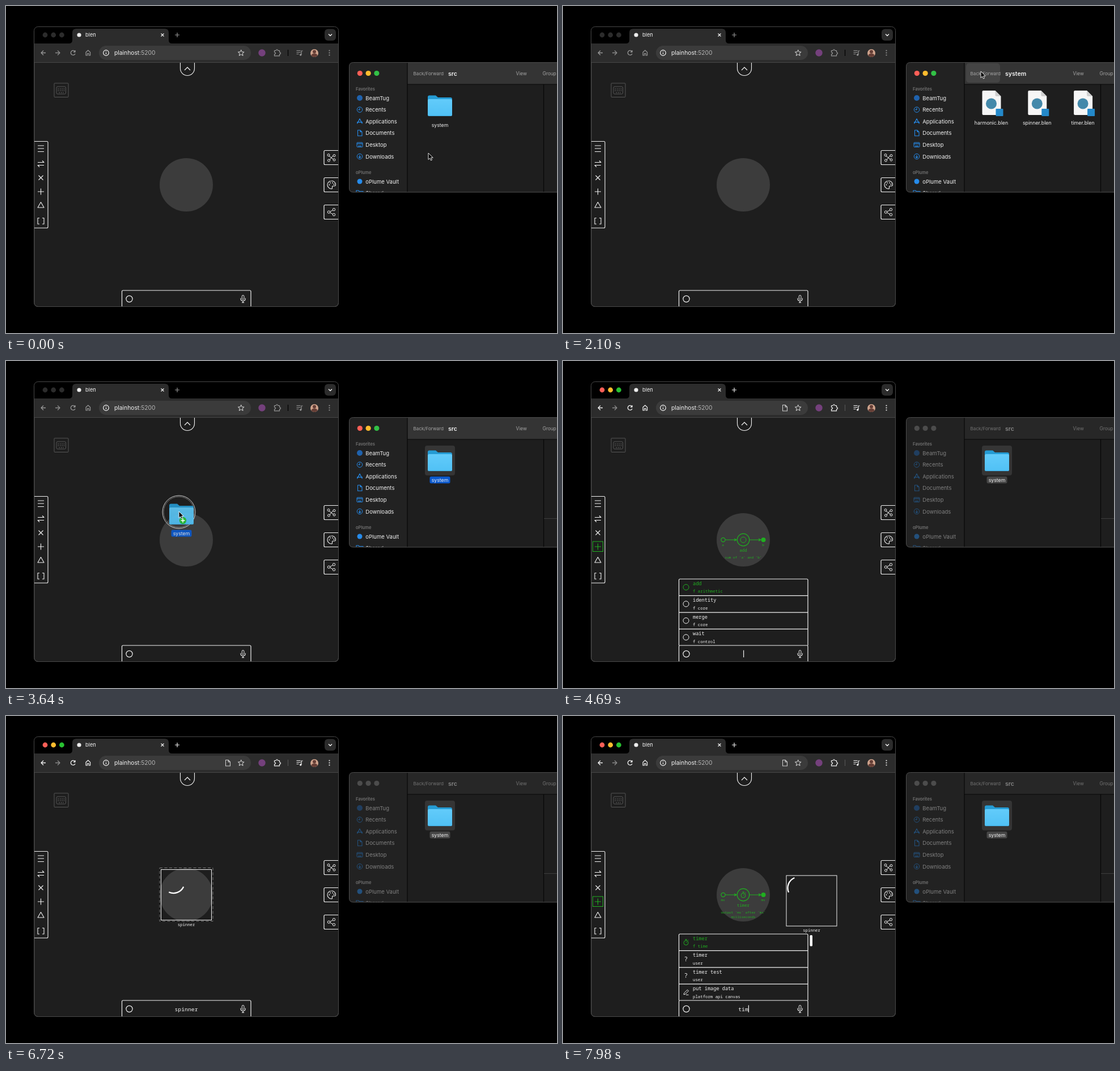
An HTML page for the animation above (8 s loop, 972 px wide and 576 px high).

```html
<!DOCTYPE html>
<html lang="en">
<head>
<meta charset="utf-8">
<title>Desktop demo</title>
<style>
html, body { margin: 0; width: 972px; height: 576px; overflow: hidden; background: #000; }
svg { display: block; font-family: Inter, "Open Sans", sans-serif; }
.mono { font-family: "Noto Sans Mono", "DejaVu Sans Mono", monospace; }
</style>
</head>
<body>
<svg id="stage" width="972" height="576" viewBox="0 0 972 576"></svg>
<script>
const LOOP = 8000, STEP = 70;
const GREEN = '#20ae20', BLUE = '#268bea', WHITE = '#f2f2f2', PAGE = '#1e1e1e';
const OPEN = 770, BACK = 2240, GRAB = 3080, DRAG = 3220, DROP = 3850, PLACE = 6440, PUSH = 6930;

// drawing helpers
const rect = (x, y, w, h, fill, stroke = 'none', r = 0, more = '') =>
  `<rect x="${x}" y="${y}" width="${w}" height="${h}" rx="${r}" fill="${fill}" stroke="${stroke}" ${more}/>`;
const circle = (x, y, r, fill, stroke = 'none', w = 1) =>
  `<circle cx="${x}" cy="${y}" r="${r}" fill="${fill}" stroke="${stroke}" stroke-width="${w}"/>`;
const path = (d, stroke = WHITE, w = 1.1, fill = 'none') =>
  `<path d="${d}" fill="${fill}" stroke="${stroke}" stroke-width="${w}" stroke-linejoin="round"/>`;
const at = (x, y, body, more = '') => `<g transform="translate(${x} ${y})" ${more}>${body}</g>`;
const text = (x, y, s, size, fill = WHITE, anchor = 'start', more = '') =>
  `<text x="${x}" y="${y}" font-size="${size}" fill="${fill}" text-anchor="${anchor}" ${more}>${s}</text>`;
const mono = (x, y, s, size, fill, anchor) => text(x, y, s, size, fill, anchor, 'class="mono"');

const CURSOR = [[0, 745, 259], [560, 757, 184], [840, 757, 184], [1190, 755, 239], [1470, 755, 239],
  [1960, 737, 115], [2170, 737, 115], [2800, 756, 155], [3010, 761, 171], [3150, 761, 171], [3640, 305, 265]];

function cursorAt(t) {
  const next = CURSOR.findIndex(k => k[0] > t);
  if (next < 0) return CURSOR.at(-1).slice(1);
  const [t0, x0, y0] = CURSOR[next - 1], [t1, x1, y1] = CURSOR[next];
  const u = (t - t0) / (t1 - t0), e = u * u * (3 - 2 * u);
  return [x0 + (x1 - x0) * e, y0 + (y1 - y0) * e];
}

// search results: icon, title, subtitle
const COMMON = [['ring', 'add', 'f arithmetic'], ['ring', 'identity', 'f core'], ['ring', 'merge', 'f core'], ['ring', 'wait', 'f control']];
const SPIN = [['ask', 'spinner test', 'user'], ['ask', 'spinner', 'user'], ['ring', 'set blen pin data', 'f graph'], ['unset', 'unset pin', 'f blen']];
const TIME = [['watch', 'timer', 'f time'], ['ask', 'timer', 'user'], ['ask', 'timer test', 'user'], ['pencil', 'put image data', 'platform api canvas']];
const SEARCH = [[0], [4690, '', COMMON, 0], [5040, 's', COMMON, 0], [5180, 'sp', SPIN, 0], [5320, 'spi', SPIN, 0],
  [5460, 'spin', SPIN, 0], [5600, 'spinner', SPIN, 1], [PLACE, 'spinner'], [PUSH, '', COMMON, 0],
  [7840, 't', TIME, 0], [7910, 'ti', TIME, 0], [7980, 'tim', TIME, 0]];

const GLYPH = {
  ask: c => mono(0, 3.8, '?', 10.5, c, 'middle'),
  ring: c => circle(0, 0, 5, 'none', c),
  watch: c => circle(0, 1, 4, 'none', c) + path('M-1.5-5h3M0-5v2M0 1l1.6-1.6M3-3l1.2-1.2', c, 1),
  unset: c => path('M-2-4h-1q-1 0-1 1v2l-1 1 1 1v2q0 1 1 1h1M5 0H-1M1-2l-2 2 2 2', c, 1),
  pencil: c => path('M-4 4l.7-2.8L2.5-4.5 4.5-2.5-1.2 3.3zM0 4.5h4.5', c, 1),
};

function folder(x, y) {
  return at(x, y, path('M-21.5-15q0-3 3-3h11l4 3.5H18.500q3 0 3 3V15q0 3-3 3h-37q-3 0-3-3z', 'none', 0, '#259bd3') +
    rect(-21.5, -11.5, 43, 30, 'url(#sky)', 'none', 2.5) + path('M-20 17.900H20', '#3aa6dc', .8));
}

function namedFolder(x, y, badge) {
  return folder(x, y) + (badge ? rect(x - 18, y + 28, 36, 12, badge, 'none', 2.5) : '') +
    text(x, y + 37, 'system', 8.7, WHITE, 'middle');
}

function fileIcon(x, name) {
  return at(x, 171, path('M-16-20q0-2 2-2H7L17-12V19q0 2-2 2H-14q-2 0-2-2z', 'none', 0, '#f6f6f6') +
    path('M7-22V-14q0 2 2 2H17z', 'none', 0, '#cfcfcf') + circle(0, 1, 9.5, '#4489aa') +
    rect(8, 10, 13, 13, '#2489ca', 'none', 1)) + text(x, 208.500, name, 8.8, WHITE, 'middle');
}

function browser(active) {
  const c = active ? '#f0f0f0' : '#969696';
  const lights = active ? ['#ff5f57', '#febc2e', '#28c131'] : Array(3).fill('#2c2c2c');
  let s = rect(50, 37, 536.500, 492.500, '#000', 'none', 7) +
    path('M111 66q6 0 6-6V47q0-7 7-7H280q7 0 7 7V60q0 6 6 6z', 'none', 0, '#2c2c2c') +
    rect(50, 66, 536, 33, '#2c2c2c') + path('M50 99.500V522.500q0 7 7 7H579.500q7 0 7-7V99.500z', '#555', .8, PAGE) +
    rect(49.500, 36.500, 537, 493, 'none', '#484848', 7);
  lights.forEach((f, i) => s += circle(69 + i * 14.7, 51, 4.4, f));
  s += circle(129, 51, 3.6, '#ededed') + text(140, 54, 'blen', 9.3) + path('M273.500 48.500l5 5M278.500 48.500l-5 5', WHITE, 1.2) +
    path('M298 51h8M302 47v8', c, 1.2) + rect(562, 40.500, 20, 20.500, '#2c2c2c', 'none', 6) + path('M569 49.500l3 3 3-3', WHITE, 1.4) +
    rect(164, 70, 268, 25, '#3b3b3b', 'none', 12.5);
  s += path('M70 82.500H62M66 78.500l-4 4 4 4', c, 1.3) + path('M87 82.500h8M91 78.500l4 4-4 4', '#8a8a8a', 1.3) +
    path('M121.500 80A4 4 0 1 0 122 84M122 78v3h-3', c, 1.3) + path('M141 87v-5.500l3.800-3.500 3.800 3.500V87h-2.500v-3.500h-2.600V87z', c, 1.2) +
    circle(176.500, 82.500, 4.8, 'none', WHITE, 1.2) + path('M176.500 82v3M176.500 79.500v1.200', WHITE, 1.2) +
    text(191, 86, 'plainhost<tspan fill="#b5b5b5">:5200</tspan>', 10.3) +
    path('M414.700 77.200l1.500 3.600 3.900.3-3 2.500 1 3.800-3.400-2-3.400 2 1-3.800-3-2.500 3.900-.3z', '#ddd', 1) +
    (active ? path('M387.500 77.500h4.500l3.500 3.500v7h-8zM392 77.500v3.500h3.500', '#ccc', 1.1) : '') +
    circle(451.500, 82.500, 6.2, '#74407c') +
    path('M473.500 78.500h3q0-2 1.500-2t1.500 2h3v3q2 0 2 1.700t-2 1.700v3h-9v-3q2 0 2-1.700t-2-1.700z', c, 1.2) +
    path('M497.500 77v11', active ? '#555' : '#000', 1.2) + path('M512.500 78.500h7M512.500 81.500h7M512.500 84.500h4M521 86v-7h2.500', c, 1.2) + circle(519.700, 86, 1.7, c) +
    circle(544, 83, 7, '#d0a48d') + path('M538.500 87q1-3.500 5.500-3.500t5.500 3.500q-2 3-5.500 3t-5.500-3z', 'none', 0, '#653e36') + circle(544, 80.500, 3, '#653e36');
  for (const y of [78.500, 82.500, 86.500]) s += circle(570.500, y, 1.1, c);
  return s;
}

function page(adding) {
  let s = circle(318, 315, 47, '#3c3c3c') + path('M307.500 100V110a12.500 12.500 0 0 0 25 0V100') + path('M315 113l5-5 5 5', WHITE, 1.2) +
    rect(85, 136, 25, 24.500, 'none', '#555', 1) + rect(89, 142, 16.500, 13, 'none', '#555', 2) +
    '<path d="M91.500 146h12M91.500 149h12M93.500 152.500h8" stroke="#5b5b5b" stroke-width="1.3" stroke-dasharray="1.5 1.900"/>';
  s += path('M50 238.500H72q2 0 2 2V389q0 2-2 2H50') + path('M56 246h11M56 251h11M56 256.500h11') +
    path('M56 275.500h11l-3-3M67 280.500H56l3 3') + path('M57.500 298.500l8 8M65.500 298.500l-8 8') +
    path('M56 327h11M61.500 321.500v11', adding ? GREEN : WHITE) + (adding ? rect(52.500, 318, 18, 17.500, 'none', GREEN) : '') +
    path('M61.500 345.500l5.500 9.500H56z') + path('M59 373.500h-3v10.500h3M64 373.500h3v10.500h-3');
  for (const y of [254, 302, 350]) s += path(`M586 ${y + .5}H563q-2 0-2 2v21q0 2 2 2h23`, WHITE, 1.2);
  s += path('M569 263.500l9 7M571 271l6-7.500', WHITE, 1);
  for (const [x, y] of [[569, 262.500], [579, 263.500], [569.500, 272], [579, 271]]) s += circle(x, y, 2, PAGE, WHITE);
  s += path('M574 308a7 7 0 1 0 0 14q2 0 1.500-2.500t2-2.500h2q2 0 2-2.500a7 7 0 0 0-7.500-6.500z');
  for (const [x, y] of [[570.500, 315], [572, 311.500], [576, 311.500], [578.500, 314]]) s += circle(x, y, .9, WHITE);
  s += path('M578 359l-8 4 8 4.500', WHITE, 1);
  for (const [x, y] of [[578.500, 358.500], [569.500, 363], [578.500, 367.500]]) s += circle(x, y, 2.2, PAGE, WHITE);
  return s;
}

function spinnerBox(x, y, color, angle) {
  const arc = angle === undefined ? '' :
    at(-22.500, -22.500, path('M-13.800-13.800A19.500 19.500 0 0 1 13.800-13.800', '#fff', 2.3), ) .replace('<path', `<path transform="rotate(${angle + 90})"`);
  return at(x, y, rect(-44.500, -44.500, 89, 89, 'none', color) + arc);
}
const dashes = color => rect(271, 267.500, 94, 94, 'none', color, 0, 'stroke-dasharray="5 3.500"');

function nodePreview(name, icon, lines, pins) {
  let s = circle(318, 315, 10.8, 'none', GREEN, 1.2) + at(318, 315, GLYPH[icon](GREEN)) +
    circle(282.500, 315, 3.6, 'none', GREEN, 1.2) + circle(353.500, 315, 4, GREEN) +
    path('M286 315h19.500M302 313l4 2-4 2M329 315h19M345 313l4 2-4 2', GREEN, 1.2) +
    mono(318, 335.500, name, 7.3, GREEN, 'middle');
  lines.forEach((l, i) => s += mono(318, 348 + i * 8, l, 6, GREEN, 'middle'));
  pins.forEach((p, i) => s += mono(282 + i * 71, 326, p, 6, GREEN, 'middle'));
  return s;
}

function preview(title) {
  if (title === 'timer') return nodePreview(title, 'watch', ['output `ms` after `ms`', 'milliseconds'], ['ms', 'ms']);
  if (!title.startsWith('spinner')) return nodePreview(title, 'ring', ['sum of `a` and `b`'], ['a', 'b']);
  return dashes(GREEN) + spinnerBox(318, 315, GREEN) + mono(318, 369.500, title, 7.3, GREEN, 'middle') +
    (title === 'spinner test' ? mono(318, 381, 'example usage of the spinner', 6, GREEN, 'middle') : '');
}

function searchBar(t, query, rows, selected) {
  let s = '';
  if (rows) {
    s += preview(rows[selected][1]) + path('M204.500 501V386q0-2 2-2H430q2 0 2 2V501', WHITE, 1.2, PAGE);
    rows.forEach(([icon, title, sub], i) => {
      const y = 384 + i * 29.400, c = i === selected ? GREEN : WHITE;
      if (i) s += path(`M204.500 ${y}H432`, WHITE, 1.2);
      s += at(217, y + 14.500, GLYPH[icon](c)) + mono(229, y + 10.800, title, 8.65, c) + mono(229, y + 24.300, sub, 7.35, c);
    });
    if (t >= PUSH) s += rect(435.500, 386, 4.500, 19.500, '#fff', 'none', 1.5);
  }
  s += path('M204.500 529V503q0-2 2-2H430q2 0 2 2V529', WHITE, 1.2, PAGE) + circle(217.500, 516, 5.600, 'none', WHITE, 1.2) +
    rect(416.300, 509.500, 3.600, 7.500, 'none', WHITE, 1.8) + path('M414 514.500v1q0 4 4.100 4t4.100-4v-1M418.100 519.500v3M416 522.500h4.200');
  if (query) s += mono(318, 519.500, query, 9.77, WHITE, 'middle');
  const caretOn = rows && !(t >= 6230 && t < PLACE);
  if (caretOn) s += rect(318 + (query.length * 5.86) / 2, 509.500, 1.2, 12.500, WHITE);
  return s;
}

function placedSpinner(t) {
  if (t < PLACE) return '';
  const k = 1 - Math.exp(-Math.max(0, t - PUSH) / 120);
  const x = 318 + 120.500 * k, y = 315 + 10.500 * k;
  return (t < PUSH ? dashes('#777') : '') + spinnerBox(x, y, WHITE, 70 + .3905 * (t - 6720)) +
    mono(x, y + 54.500, 'spinner', 7.3, WHITE, 'middle');
}

const PLACES = [
  ['BeamTug', circle(0, 0, 5, '#1f62ad')],
  ['Recents', circle(0, 0, 4.700, 'none', BLUE) + path('M0-3V0H-2.500', BLUE)],
  ['Applications', path('M-4.500 4L0-4.500 4.500 4M-5 1.500H5', BLUE, 1.3)],
  ['Documents', path('M-3.500-5H1L4-2V5H-3.500zM1-5v3h3', BLUE)],
  ['Desktop', rect(-5, -4, 10, 8, 'none', BLUE, 1) + path('M-5-1.800H5M-3 2.200H3', BLUE, 1.4)],
  ['Downloads', circle(0, 0, 4.700, 'none', BLUE) + path('M0-2.500v5M-2 .5l2 2 2-2', BLUE)],
];

function finder(t) {
  const active = t < DROP, inside = t >= OPEN && t < BACK;
  const selected = (t >= 560 && t < OPEN) || t >= GRAB;
  const paneLine = (t >= 560 && t < OPEN) || t >= DRAG;
  const dim = active ? '' : 'opacity=".45"';
  const lights = active ? ['#ff5f57', '#febc2e', '#32c146'] : Array(3).fill('#4c4c4c');
  let s = rect(605.500, 99.500, 400, 228.500, PAGE, 'none', 7) +
    path('M708 100H612.500q-7 0-7 7V321q0 7 7 7H708z', 'none', 0, '#222') +
    rect(708, 100, 264, 38, active ? '#343434' : '#272727') +
    path('M708 100V328M708 138H972M948.500 138V328', '#070707', 1.2);
  if (paneLine) s += path('M949 277.500H972', '#3c3c3c');
  lights.forEach((f, i) => s += circle(624.300 + i * 14.800, 118.500, 4.600, f));
  if (t >= 2100 && t < BACK) s += rect(711, 101, 60, 34, '#444', 'none', 5);
  const head = active ? '#a5a5a5' : '#737373';
  s += text(718.500, 121.500, 'Back/Forward', 8.15, head) + text(899.500, 121.500, 'View', 8.300, head) + text(946.500, 121.500, 'Group', 8.300, head) +
    text(780, 122.500, inside ? 'system' : 'src', 10.600, active ? WHITE : '#858585', 'start', 'font-weight="600"') +
    text(617, 149, 'Favorites', 7.600, '#727272', 'start', 'font-weight="600"') + text(617, 295.500, 'oPlume', 7.600, '#727272', 'start', 'font-weight="600"');
  const items = PLACES.map(([name, icon], i) => at(624, 162 + i * 20.600, icon + text(10.300, 3.500, name, 9.5))).join('') +
    at(624, 309, circle(0, 0, 4.500, BLUE) + text(10.300, 3.500, 'oPlume Vault', 9.5)) +
    at(624, 329, path('M-6-4h4l1 1.500h7V4H-6z', BLUE, 1.2) + text(10.300, 3.500, 'Shared', 9.5));
  s += `<g clip-path="url(#pane)" ${dim}>${items}</g>`;
  if (inside) {
    s += ['harmonic', 'spinner', 'timer'].map((n, i) => fileIcon(755.500 + i * 80.800, n + '.blen')).join('');
    if (t >= 910 && t < 1540) s += rect(709.500, 322, 220, 5.500, '#9b9b9b', 'none', 2.500);
  } else {
    if (selected) s += rect(739, 149, 53, 52.500, '#353535', 'none', 4);
    s += namedFolder(765.500, 175.500, selected && (active ? '#0a59cf' : '#464646'));
    if (t >= BACK && t < 3010) s += rect(709.500, 322, 231, 5.500, '#9b9b9b', 'none', 2.500) + rect(941, 139, 5.500, 100, '#9b9b9b', 'none', 2.500);
  }
  return s + path('M972 99.500H612.500q-7 0-7 7V321q0 7 7 7H972', '#555', .9);
}

function pointer(t) {
  if (t >= 4690) return '';
  const [x, y] = cursorAt(t), dragging = t >= DRAG && t < DROP, over = dragging && x < 587;
  let s = '';
  if (over) s += circle(x, y + 1, 29, 'none', '#ddd', .9) + circle(x, y + 1, 27, 'none', '#888', .8);
  if (dragging) s += `<g opacity=".9">${namedFolder(x + 4.500, y + 4.500, '#0a59cf')}</g>`;
  if (over) s += at(x + 7, y + 16, circle(0, 0, 6.200, '#27b43a') + path('M-3.500 0h7M0-3.500v7', '#fff', 1.5));
  return s + at(x, y, path('M0 0V11.500L2.700 9 4.500 13 6.500 12.100 4.700 8.200H8.300z', '#fff', .9, '#000'));
}

const DEFS = `<defs><linearGradient id="sky" x2="0" y2="1"><stop stop-color="#62cbfa"/><stop offset="1" stop-color="#50c1f5"/></linearGradient>
  <clipPath id="pane"><rect x="606" y="100" width="102" height="227.500"/></clipPath></defs>`;

function scene(t) {
  const [, query, rows, selected] = SEARCH.findLast(k => k[0] <= t);
  return DEFS + browser(t >= DROP) + page(!!rows) + placedSpinner(t) + searchBar(t, query, rows, selected) + finder(t) + pointer(t);
}

const stage = document.getElementById('stage');
let shown = -1;
function tick() {
  const t = Math.floor(performance.now() % LOOP / STEP) * STEP;
  if (t !== shown) stage.innerHTML = scene(shown = t);
  requestAnimationFrame(tick);
}
tick();
</script>
</body>
</html>
```
